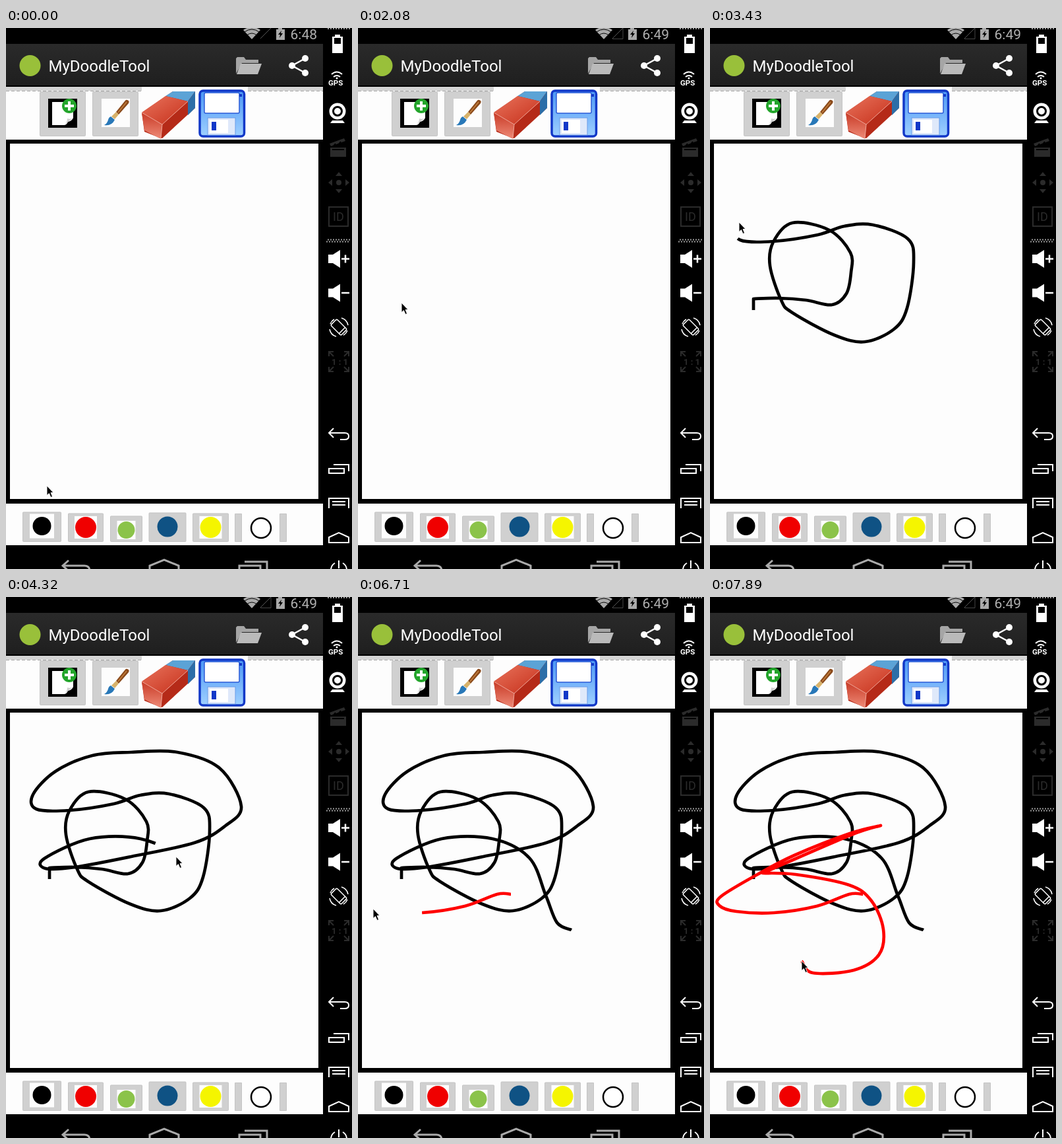
An HTML page for the animation above (8000 ms loop, 525 px wide and 819 px high).

```html
<!DOCTYPE html>
<html lang="en">
<head>
<meta charset="utf-8">
<title>Drawing app</title>
<style>
html, body { margin: 0; width: 100%; height: 100%; overflow: hidden; background: #000; }
svg { display: block; width: 100%; height: 100%; }
text { font-family: Roboto, "Open Sans", sans-serif; }
.line { fill: none; stroke: #fff; stroke-width: 2; }
.thin { stroke-width: 1.5; }
.dim { fill: none; stroke: #2b2b2b; stroke-width: 2; }
.dimfill { fill: #2b2b2b; }
.nav { fill: none; stroke: #aaa; stroke-width: 3; }
.btn { fill: #d0d0d0; stroke: #c4c4c4; }
.paper { fill: #fdfdfd; }
.ink { fill: none; stroke-width: 4.7; stroke-linejoin: round; }
</style>
</head>
<body>
<svg viewBox="0 0 525 819">
  <defs>
    <linearGradient id="bar" x2="0" y2="1"><stop stop-color="#2a2a2a"/><stop offset="1" stop-color="#1f1f1f"/></linearGradient>
    <linearGradient id="redTop" x2="1" y2="1"><stop stop-color="#e8735c"/><stop offset="1" stop-color="#c62f1a"/></linearGradient>
    <linearGradient id="redSide" x2="0" y2="1"><stop stop-color="#c83a26"/><stop offset="1" stop-color="#ee8b78"/></linearGradient>
    <linearGradient id="disk" x2="0" y2="1"><stop stop-color="#4b97f5"/><stop offset="1" stop-color="#9fd0ff"/></linearGradient>
    <path id="speaker" d="M489 343h7l11-7v27l-11-7h-7z" fill="#fff"/>
  </defs>

  <!-- status bar -->
  <path d="M373 17L360 3Q373-6 386 3z" fill="#aaa"/>
  <path d="M362 6q11-8 22 0M366 10.500q7-5 14 0" fill="none" stroke="#000"/>
  <path d="M386 16L402 0" fill="none" stroke="#555"/>
  <path id="signal" d="M402 0V16.500H386" fill="none" stroke="#444"/>
  <path d="M410 2h3v-2h6v2h4v16h-13z" fill="#aaa"/>
  <path d="M418 4l-5 6h3l-1 5 5-7h-3z" fill="#000"/>
  <text id="clock" x="431.500" y="16.500" font-size="21" fill="#b0b0b0">6:48</text>

  <!-- title bar -->
  <rect y="24" width="481" height="63" fill="url(#bar)"/>
  <circle cx="36.500" cy="57" r="16" fill="#99c03a"/>
  <text x="64.500" y="65.500" font-size="24" fill="#fff">MyDoodleTool</text>
  <path d="M349 69V46l2-2h10l3 4h19v5h-25z" fill="#a5a5a5"/>
  <path d="M356 54h32l-6 16h-32z" fill="#bababa"/>
  <path d="M454 46L434 57l20 11" fill="none" stroke="#fff" stroke-width="2.500"/>
  <g fill="#fff"><circle cx="434" cy="57" r="5"/><circle cx="454" cy="46" r="5"/><circle cx="454" cy="68" r="5"/></g>

  <!-- tools -->
  <rect class="paper" y="89" width="481" height="80"/>
  <path d="M0 92H206M367 92H481" stroke="#d4d4d4" stroke-width="6"/>
  <path d="M0 95.500H206M367 95.500H481" stroke="#aaa" stroke-dasharray="5 3"/>
  <rect class="btn" x="51.500" y="96.500" width="69" height="67" rx="1"/>
  <rect x="64" y="107" width="44" height="44"/>
  <path d="M70 112h32v24q-2 5-8 6-2 5-6 5H70z" fill="#fff"/>
  <path d="M88 147q5-4 5-10 5 2 9-1z" fill="#cfcfcf"/>
  <circle cx="96" cy="118" r="11" fill="#23a52b"/>
  <path d="M96 111v14M89 118h14" stroke="#fff" stroke-width="4"/>
  <rect class="btn" x="131.500" y="96.500" width="69" height="67" rx="1"/>
  <rect class="paper" x="145" y="107" width="43" height="43"/>
  <path d="M184 109q4 1 2 5l-15 17-4-4 13-16q2-3 4-2z" fill="#8a4a1c"/>
  <path d="M183 112l-13 16" stroke="#c4803d" stroke-width="1.500"/>
  <path d="M167 127l4 4-6 7-5-4z" fill="#d8b26a"/>
  <path d="M159 134l6 5q-5 10-16 8 5-3 6-8 1-4 4-5z" fill="#2878b8"/>

  <path d="M206 128l47-32h34v25l-50 46h-2l-25-10z" fill="#b52a18"/>
  <path d="M253 96h34l-11 15-34-8z" fill="#5ba3d6"/>
  <path d="M287 96v25l-11 11v-21z" fill="#2c6ea8"/>
  <path d="M242 103l34 8-39 35-31-18z" fill="url(#redTop)"/>
  <path d="M206 128l31 18-2 22-25-13z" fill="url(#redSide)"/>
  <path d="M206 128l31 18 39-35M237 146l-2 21" fill="none" stroke="#f0a698"/>

  <rect x="294" y="95" width="67.500" height="69" rx="5" fill="url(#disk)" stroke="#1238c8" stroke-width="3.500"/>
  <rect x="301" y="98" width="53" height="31" rx="2" fill="#fff" stroke="#2b5bd8" stroke-width="1.500"/>
  <rect x="306" y="136" width="42" height="26" fill="#dfe9fa" stroke="#6b9be8"/>
  <rect x="309" y="139" width="28" height="20" fill="#fff"/>
  <rect x="312" y="142" width="7" height="13" fill="#1238c8"/>
  <rect x="354" y="100" width="4" height="4" fill="#1238c8"/>

  <!-- drawing sheet -->
  <rect class="paper" x="6" y="175" width="468" height="538"/>

  <!-- palette -->
  <rect class="paper" y="720" width="481" height="63"/>
  <g id="palette"></g>
  <path class="btn" d="M347.500 735.500h10v42h-10zM415.500 735.500h10v42h-10z"/>
  <circle cx="387" cy="757" r="15" fill="#fff" stroke="#000" stroke-width="2.500"/>

  <g class="nav">
    <path d="M95 806l-9 8 9 8M86 814h33q8 0 8 8"/>
    <path d="M218 822v-8l22-9 22 9v8"/>
    <path d="M354 822v-8h32v8M362 808h34v12"/>
  </g>

  <!-- emulator strip -->
  <path d="M488 1H523M488 320.500H523M486 323.500H521" stroke="#999" stroke-width="2" stroke-dasharray="2 2"/>
  <path d="M499 10h8v3h4v25h-16V13h4z" fill="#fff"/>
  <rect x="498" y="15" width="10" height="9" fill="#000"/>
  <path class="line" d="M494 70q8-7 16 0M497 74q5-4 10 0"/>
  <circle cx="502" cy="76" r="1.500" fill="#fff"/>
  <text x="489" y="87" font-size="11.500" font-weight="700" fill="#fff">GPS</text>
  <circle cx="503" cy="126" r="12.500" fill="#fff"/>
  <circle cx="503" cy="126" r="6.500" fill="none" stroke="#000" stroke-width="3"/>
  <path d="M495 140h16l3 4h-22z" fill="#fff"/>

  <path class="dimfill" d="M492 181h24v14h-24zM491 175l22-8 2 4-22 8z"/>
  <path d="M496 180l4-5M504 177l4-5M495 184h18" stroke="#000" stroke-width="2"/>
  <g class="dimfill">
    <circle cx="505" cy="234" r="4"/>
    <path d="M505 218l5 6h-10zM505 250l5-6h-10zM489 234l6-5v10zM521 234l-6-5v10z"/>
  </g>
  <rect class="dim" x="490" y="271" width="29" height="29"/>
  <text x="496" y="292" font-size="18" fill="#2b2b2b">ID</text>

  <use href="#speaker"/><use href="#speaker" y="51.500"/>
  <path d="M509 349.500h12M515 343.500v12M509 401h12" stroke="#fff" stroke-width="2.500"/>
  <g class="line thin">
    <path d="M498.500 444q0-2 2-2h9q2 0 2 2v18q0 2-2 2h-9q-2 0-2-2zM499 460h12" transform="rotate(-45 505 453)"/>
    <path d="M491 456a14 14 0 0 0 10 11M519 450a14 14 0 0 0-10-11M492 448a14 14 0 0 1 6-7M518 458a14 14 0 0 1-6 7"/>
  </g>
  <path class="dim" d="M490 497v-7h7M490 490l7 7M520 497v-7h-7M520 490l-7 7M490 513v7h7M490 520l7-7M520 513v7h-7M520 520l-7-7"/>
  <text x="494" y="510" font-size="13" font-weight="700" fill="#2b2b2b">1 : 1</text>

  <g class="line">
    <path d="M497 606l-7 7 7 7M490 613h24q6 0 6 5t-6 5h-7"/>
    <path d="M490 674v-7h23v7zM497 661h23v10"/>
    <path d="M490 727v-15h30v15M495 717h20M495 722h20"/>
    <path d="M490 779v-8l15-7 15 7v8z"/>
    <path d="M499 810a12 12 0 1 0 12 0M505 806v12"/>
  </g>

  <path id="black" class="ink" stroke="#000"/>
  <path id="red" class="ink" stroke="#f00"/>
  <path id="cursor" d="M0 0V14.500L3.400 11.500 6 17.500 8.500 16.400 6 10.500H10z" stroke="#fff" stroke-width=".9"/>
</svg>
<script>
const $ = id => document.getElementById(id);
const LOOP = 8000, TICK = 149;

const clamp = v => Math.max(0, Math.min(1, v));
const ease = (t, from, to, power) => clamp((t - from) / (to - from)) ** power;

function swatch(cx, cy, r, width, color, paper = r + 1) {
  const top = cy - 21;
  return `<rect class="btn" x="${cx - width / 2}" y="${top}" width="${width}" height="${777.5 - top}" rx="1"/>
    <rect class="paper" x="${cx - paper}" y="${cy - paper}" width="${2 * paper}" height="${2 * paper}"/>
    <circle cx="${cx}" cy="${cy}" r="${r}" fill="${color}"/>`;
}
$('palette').innerHTML =
  swatch(54.5, 754, 14, 58, '#000', 18.5) +
  swatch(121, 756, 16, 53, '#f00000') +
  swatch(182.5, 760, 13, 48, '#8bc34a') +
  swatch(245, 755, 15.5, 56, '#0f5284', 0) +
  swatch(310.5, 756, 16, 54, '#f5f500');

// Smooth curve through key points; a doubled point is a sharp corner.
function curve(text) {
  const pts = text.split(' ').map(p => p.split(',').map(Number));
  let d = 'M' + pts[0];
  for (let i = 0; i < pts.length - 1; i++) {
    const a = pts[i], b = pts[i + 1], before = pts[i - 1] || a, after = pts[i + 2] || b;
    if (a + '' === b + '') continue;
    const c1 = a.map((v, j) => v + (b[j] - before[j]) / 6);
    const c2 = b.map((v, j) => v - (after[j] - a[j]) / 6);
    d += `C${c1} ${c2} ${b}`;
  }
  return d;
}

// The pointer runs ahead of the ink by lead pixels between two ticks.
const strokes = [
  {
    path: $('black'), lead: 28, from: 14, to: 29,
    done: k => .92 * ease(k, 14, 29, 1.21) + .08 * ease(k, 29, 34, 1.5),
    d: curve('66,427 66,410 66,410 104,409 146,412 185,419 207,402 214,370 213,340 181,306 125,295 96,324 91,360 108,412 125,431 189,465 235,475 279,456 299,424 309,355 300,319 247,298 204,300 164,313 96,323 46,321 41,299 75,264 131,240 190,235 260,235 324,259 357,317 332,347 286,372 190,393 105,409 60,411 58,396 127,366 204,366 260,395 285,452 302,493 324,504')
  },
  {
    path: $('red'), lead: 75, from: 42, to: 54,
    done: k => ease(k, 42, 53, 1.59),
    d: curve('232,450 211,450 162,468 97,478 40,476 14,467 17,453 72,420 128,391 212,358 259,346 259,346 212,361 80,418 80,418 130,420 211,436 245,460 263,503 256,542 218,565 156,569 139,551')
  }
];
for (const s of strokes) {
  s.path.setAttribute('d', s.d);
  s.length = s.path.getTotalLength();
}

// Free pointer travel: tick, x, y
const moves = [[0, 62, 693], [1, 57, 758], [4, 57, 758], [10, 205, 375], [12, 88, 375], [14, 66, 416],
  [29, 258, 393], [32, 324, 504], [36, 120, 728], [39, 120, 758], [42, 232, 450], [54, 139, 551]];

function travel(k) {
  const i = moves.findIndex(m => m[0] > k), [t0, x0, y0] = moves[i - 1], [t1, x1, y1] = moves[i];
  const f = (k - t0) / (t1 - t0);
  return { x: x0 + (x1 - x0) * f, y: y0 + (y1 - y0) * f };
}

function draw(time) {
  const k = Math.floor((time % LOOP + 8) / TICK);
  let tip = travel(k);
  for (const { path, length, lead, from, to, done } of strokes) {
    const ink = length * done(k);
    path.style.strokeDasharray = `${ink} ${length + 9}`;
    path.style.display = ink ? '' : 'none';
    if (k > from && k < to) tip = path.getPointAtLength(ink + lead);
  }
  $('cursor').setAttribute('transform', `translate(${Math.round(tip.x)} ${Math.round(tip.y)})`);
  $('clock').textContent = k < 1 ? '6:48' : '6:49';
  $('signal').style.display = k < 1 ? 'none' : '';
}

const start = performance.now();
function frame() {
  draw(performance.now() - start);
  requestAnimationFrame(frame);
}
frame();
</script>
</body>
</html>
```
